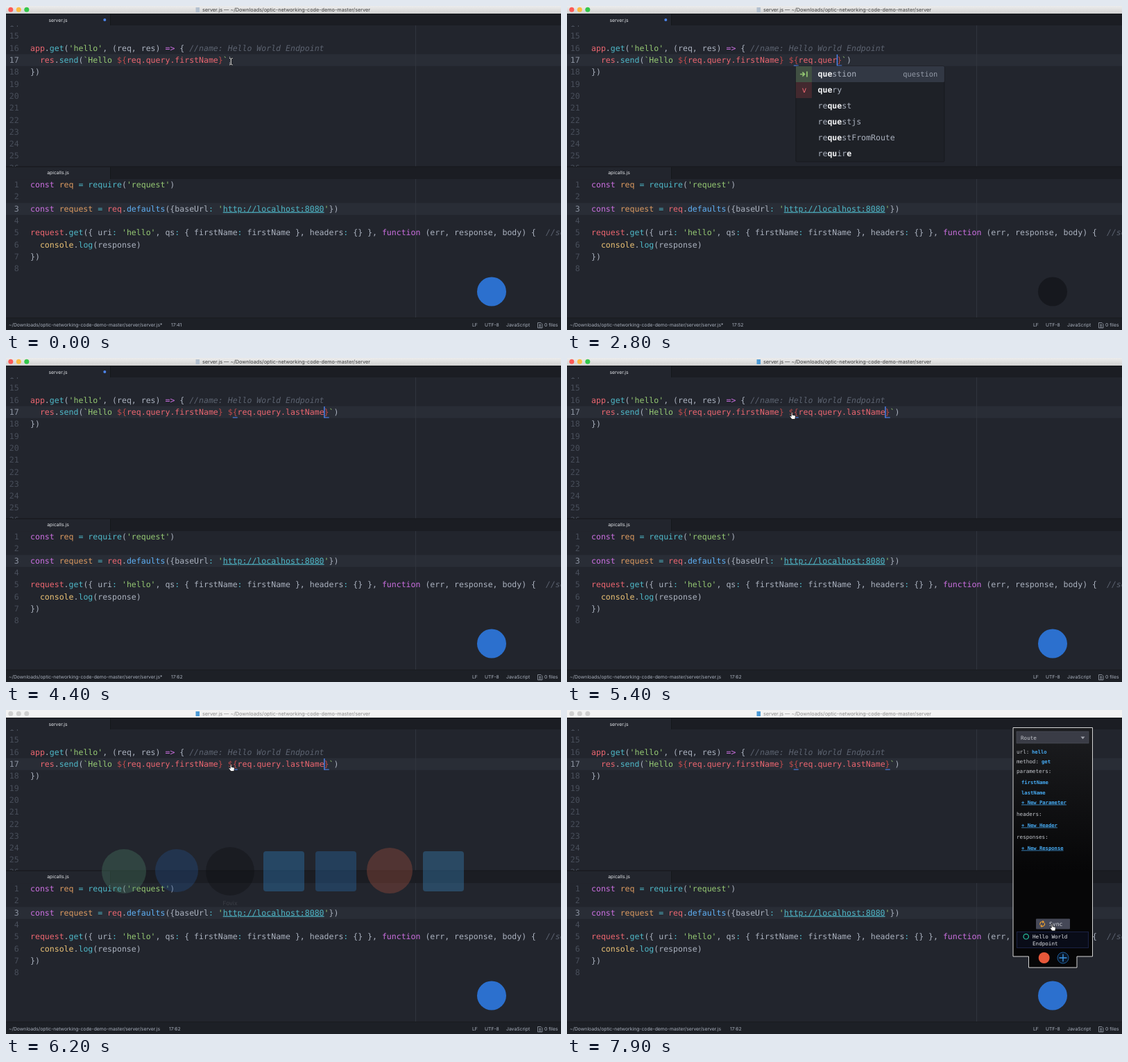
These frames come from a looping animation (800x468 px, 8 s). An HTML page:

```html
<!DOCTYPE html>
<html lang="en">
<head>
<meta charset="utf-8">
<title>Editor demo</title>
<style>
html, body { margin: 0; width: 100%; height: 100%; overflow: hidden; background: #22252d; }
svg { display: block; width: 800px; height: 468px; }
text { white-space: pre; text-rendering: geometricPrecision; }
.code { font: 11.54px "DejaVu Sans Mono", monospace; }
.ui { font: 6.8px Inter, sans-serif; }
.panel { font: 7.6px "DejaVu Sans Mono", monospace; }
.w { fill: #abb2bf; } .r { fill: #ec6670; } .d { fill: #bf4a4c; } .g { fill: #95c873; }
.p { fill: #cb6fe0; } .b { fill: #5fb0f5; } .c { fill: #4fb9c9; } .o { fill: #db9a60; }
.y { fill: #ebc275; } .k { fill: #5c6370; font-style: italic; }
.u { fill: #4fb9c9; text-decoration: underline; }
.m { fill: #f4f5f7; font-weight: bold; }
</style>
</head>
<body>
<svg viewBox="0 0 800 468" xml:space="preserve">
  <defs>
    <clipPath id="topPane"><rect y="28" width="800" height="204"/></clipPath>
    <linearGradient id="bar" x2="0" y2="1"><stop stop-color="#ececec"/><stop offset="1" stop-color="#d2d2d2"/></linearGradient>
    <linearGradient id="sheet" x2="0" y2="1"><stop stop-color="#1c1d20"/><stop offset=".6" stop-color="#060607"/></linearGradient>
  </defs>
  <g id="base"></g>
  <g id="live"></g>
</svg>
<script>
const CW = 6.947, LEFT = 35, ROW = 17.3, LOOP = 8000;
const $ = id => document.getElementById(id);
const col = i => LEFT + i * CW;
const topY = n => 82 + (n - 17) * ROW;
const lowY = n => 262 + (n - 1) * ROW;

const rect = (x, y, w, h, fill, more = '') =>
  `<rect x="${x}" y="${y}" width="${w}" height="${h}" fill="${fill}" ${more}/>`;
const circle = (x, y, r, fill, more = '') =>
  `<circle cx="${x}" cy="${y}" r="${r}" fill="${fill}" ${more}/>`;
const path = (d, more) => `<path d="${d}" ${more}/>`;
const text = (x, y, s, cls, more = '') => `<text x="${x}" y="${y}" class="${cls}" ${more}>${s}</text>`;

// Each piece after a bar starts with its colour class.
const paint = s => s.split('¦').slice(1).map(p => `<tspan class="${p[0]}">${p.slice(1)}</tspan>`).join('');
const code = (y, s) => text(LEFT, y, paint(s), 'code');
const lineNo = (n, y, on) => text(18.6, y, n, 'code', `text-anchor="end" fill="${on ? '#8b92a0' : '#484e5a'}"`);

function drawBase() {
  let s = rect(0, 0, 800, 468, '#22252d');
  s += rect(0, 69.5, 800, 17.3, '#292d36') + rect(0, 284.5, 800, 17.3, '#292d36');
  s += rect(590, 28, 1, 422, '#30343d');
  s += rect(0, 11, 800, 17, '#1b1d23') + rect(0, 11, 150, 18, '#22252d');
  s += rect(0, 232, 800, 18, '#1b1d23') + rect(0, 232.5, 150, 18, '#22252d');
  s += rect(150, 12, 1, 16, '#15171b') + rect(150, 233, 1, 17, '#15171b') + rect(0, 231.5, 800, 1, '#17191d');
  const tab = 'text-anchor="middle" fill="#e4e6ea" font-weight="500"';
  s += text(75, 22.5, 'server.js', 'ui', tab) + text(75, 243.3, 'apicalls.js', 'ui', tab);

  let rows = '';
  for (let n = 14; n <= 26; n++) rows += lineNo(n, topY(n), n === 17);
  s += `<g clip-path="url(#topPane)">${rows}</g>`;
  for (let n = 1; n <= 8; n++) s += lineNo(n, lowY(n), n === 3);

  s += code(topY(16), "¦rapp¦w.¦cget¦w(¦g'hello'¦w, (req, res) ¦p=>¦w { ¦k//name: Hello World Endpoint");
  s += code(topY(18), '¦w})');
  s += code(lowY(1), "¦pconst ¦oreq ¦c= require¦w(¦g'request'¦w)");
  s += code(lowY(3), "¦pconst ¦orequest ¦c= ¦rreq¦w.¦bdefaults¦w({baseUrl¦c: ¦g'¦uhttp://localhost:8080¦g'¦w})");
  s += code(lowY(5), "¦rrequest¦w.¦cget¦w({ uri¦c: ¦g'hello'¦w, qs¦c: ¦w{ firstName¦c: ¦wfirstName }, headers¦c: ¦w{} }, " +
    '¦pfunction ¦w(err, response, body) {  ¦k//send');
  s += code(lowY(6), '¦y  console¦w.¦clog¦w(response)') + code(lowY(7), '¦w})');

  s += rect(0, 450, 800, 18, '#1d2026') + rect(0, 450, 800, .7, '#17191d');
  for (const [x, label] of [[672, 'LF'], [690, 'UTF-8'], [721, 'JavaScript'], [776, '0 files']])
    s += text(x, 463.3, label, 'ui w');
  s += path('M766.5 457.5h4.5l2 2v5.5h-6.500zM768 461h3.500M769.700 459.300v3.400M768 463.800h3.500',
    'fill="none" stroke="#9aa1ad" stroke-width=".8"');
  $('base').innerHTML = s;
}

const TYPED = ' ${req.query.lastName';
const KEYS = [500, 800, 1200, 1600, 1800, 2000, 2200, 2300, 2500, 2600, 2800,
  2900, 3000, 3200, 3300, 3400, 3700, 3900, 4000, 4200, 4300];
const countAt = t => KEYS.filter(k => k <= t).length;

const LISTS = [
  { start: 3, width: 196, icons: true, items: [['req', 'CommonJS require', 'snip'], ['ret', 'return', 'snip'], ['review', 'review', 'snip']] },
  { start: 7, width: 214, icons: true, items: [['question', 'question', 'snip'], ['query', '', 'var'], ['request'],
    ['requestjs'], ['requestFromRoute'], ['require']] },
  { start: 13, width: 140, items: [['localhost']] }
];

// Marks the letters of a word that match the prefix in order; null when it does not fit.
function fuzzy(word, prefix) {
  let i = 0;
  const out = [...word].map(ch => ch === prefix[i] ? (i++, '¦m' + ch) : '¦w' + ch).join('');
  return i === prefix.length ? out : null;
}

function popup(list, typed) {
  const prefix = typed.slice(list.start);
  if (!prefix) return '';
  const rows = list.items.map(it => [fuzzy(it[0], prefix), ...it.slice(1)]).filter(r => r[0]);
  if (!rows.length) return '';
  const wordX = col(40 + list.start), x = wordX - (list.icons ? 31.6 : 7), h = 23;
  const end = x + list.width;
  let s = rect(x, 87, list.width, rows.length * h, '#1e2127', 'rx="1.5" stroke="#17191d" stroke-width=".8"');
  s += rect(x, 87, list.width, list.icons ? h : 22.5, '#323844', 'rx="1.5"');
  rows.forEach(([label, hint, kind], i) => {
    const y = 87 + i * h;
    if (kind === 'snip') {
      s += rect(x, y, 23, h, i ? '#2d3833' : '#415043');
      s += path(`M${x + 6} ${y + 11.500}h6M${x + 9.500} ${y + 8.500}l3 3l-3 3M${x + 16} ${y + 7.500}v8`,
        'fill="none" stroke="#95c873" stroke-width="1.7"');
    } else if (kind === 'var') {
      s += rect(x, y, 23, h, '#43292f') + text(x + 8.5, y + 14.800, 'v', 'code r', 'font-weight="bold"');
    }
    s += text(wordX, y + 15, paint(label), 'code');
    if (hint) {
      const place = list.start === 3 ? `${x + 84}` : `${end - 9.5 - hint.length * 6.26}`;
      s += text(place, y + 14.600, hint, 'code', `style="font-size:10.4px" fill="${i ? '#6b7280' : '#949ba8'}"`);
    }
  });
  return s;
}

function titleBar(active, dirty) {
  let s = rect(0, 0, 800, 11, active ? 'url(#bar)' : '#f3f3f3') + rect(0, 11, 800, .8, '#111317');
  ['#fc5b57', '#fdbc40', '#34c84a'].forEach((c, i) => s += circle(6.8 + i * 11.5, 5.3, 3.5, active ? c : '#cfcfcf'));
  s += rect(273.5, 2, 5.500, 7, dirty ? '#b3c0cf' : '#4d9bd6');
  return s + text(283, 8.1, 'server.js — ~/Downloads/optic-networking-code-demo-master/server', 'ui',
    `style="font-size:7.27px" fill="${active ? '#3c3c3c' : '#8a8a8a'}"`);
}

function switcher(opacity) {
  const sq = (x, fill) => rect(x, 204, 59, 58, fill, 'rx="4"');
  return `<g opacity="${opacity}">` +
    circle(170, 233, 32, '#4b7f66') + circle(246, 232, 31, '#24508c') +
    circle(323, 233, 35, '#0c0d10') + sq(371, '#2f86cc') + sq(446, '#2a6fb0') +
    circle(553, 232, 33, '#a9523f') + sq(601, '#3a8cc8') +
    text(323, 282, 'Fovix', 'ui', 'text-anchor="middle" style="font-size:8.5px" fill="#6a6e76"') + '</g>';
}

function routePanel() {
  let s = path('M643 25.500H757.500V356H735V372H665.500V356H643Z', 'fill="url(#sheet)" stroke="#d4d4d4"');
  s += rect(648, 31, 104, 17, '#3a3c46', 'stroke="#4a4d58" stroke-width=".7"');
  s += path('M740.500 38.500h6l-3 3.500z', 'fill="#a5a8b0"');
  const plain = (x, y, t) => text(x, y + 2.700, t, 'panel', 'fill="#c3c6cc"');
  const blue = (x, y, t, deco = 'none') => text(x, y + 2.600, t, 'panel',
    `style="font-size:7.2px;font-weight:bold;text-decoration:${deco}" fill="#46aaf2"`);
  s += plain(654, 40, 'Route') + plain(648, 60, 'url:') + blue(670, 60, 'hello');
  s += plain(648, 74, 'method:') + blue(684, 74, 'get') + plain(648, 88.5, 'parameters:');
  s += blue(655, 104, 'firstName') + blue(655, 119, 'lastName') + blue(655, 133, '+ New Parameter', 'underline');
  s += plain(648, 150, 'headers:') + blue(655, 166, '+ New Header', 'underline');
  s += plain(648, 183, 'responses:') + blue(655, 199, '+ New Response', 'underline');
  s += rect(676, 301.500, 49, 15, '#454857', 'rx="1"');
  s += path('M682 310.500a3.300 3.300 0 0 1 4.500 -4.300M688.200 307.500a3.300 3.300 0 0 1 -4.500 4.400M685.500 304.500l1.800 1.800l-2 1.400M684.700 313.600l-1.800 -1.800l2 -1.400',
    'fill="none" stroke="#f0a030" stroke-width="1.1"');
  s += text(695, 312, 'Sync', 'panel', 'style="font-size:8px" fill="#d3d5da"');
  s += rect(648.500, 320.500, 103, 23, '#090c18', 'stroke="#1a2244"');
  s += circle(661.700, 327.300, 3.700, 'none', 'stroke="#28c3a0" stroke-width="1.2"');
  s += text(671, 330, 'Hello World', 'panel', 'fill="#e2e4e8"') + text(671, 339.500, 'Endpoint', 'panel', 'fill="#e2e4e8"');
  s += circle(687.700, 358, 8, '#e8583a') + circle(715, 358, 8, '#0a1626', 'stroke="#1f5f9c"');
  return s + path('M709.500 358h11M715 352.500v11', 'stroke="#3d9bea" stroke-width="1.300"');
}

const ramp = (t, a, b) => Math.min(1, Math.max(0, (t - a) / (b - a)));
const ease = k => k * k * (3 - 2 * k);

function button(t) {
  const glow = t < 2700 ? 1 - ramp(t, 900, 2500) : ramp(t, 2900, 3400);
  const mix = (a, b) => Math.round(a + (b - a) * glow);
  return circle(700, 412.500, 21, `rgb(${mix(22, 44)},${mix(24, 112)},${mix(30, 206)})`);
}

function pointer(t) {
  if (t < 500) {
    const d = 'M322 75.500q2 0 2.300 1.300q.3 -1.300 2.300 -1.300M324.300 76.500v7.500M322 85q2 0 2.300 -1.300q.3 1.300 2.300 1.300';
    return path(d, 'fill="none" stroke="#111" stroke-width="2.200"') + path(d, 'fill="none" stroke="#eee"');
  }
  if (t < 5000) return '';
  const k = ease(ramp(t, 6600, 7300));
  return path('M-1.800 -4q1 -1 1.800 0v3.200l3.600 .8q1 .3 .8 1.600l-.7 3.900h-4.600l-3 -4q0 -1.300 1.200 -.9l.9 .8z',
    `transform="translate(${325 + 375 * k} ${83 + 230.500 * k})" fill="#fff" stroke="#111" stroke-width=".8"`);
}

function draw(t) {
  const n = countAt(t), typed = TYPED.slice(0, n), dirty = t < 4700, focus = t < 6300;
  let s = titleBar(t < 6100, dirty);
  if (dirty) s += circle(142.300, 20, 2, '#4d86ee');

  const added = n < 3 ? '¦g' + typed : '¦g ¦d${¦r' + typed.slice(3) + '¦d}';
  s += code(topY(17), '¦r  res¦w.¦csend¦w(¦g`Hello ¦d${¦rreq.query.firstName¦d}' + added + '¦g`¦w)');
  if (n >= 3) for (const i of [42, 40 + n]) s += rect(col(i), 85.500, CW, 1, '#528bff');
  const lastKey = n ? KEYS[n - 1] : -400;
  if (focus && Math.floor((t - lastKey) / 400) % 2 === 0) s += rect(col(40 + n) - .5, 70, 1.300, 16.500, '#528bff');

  s += text(4, 463.300, '~/Downloads/optic-networking-code-demo-master/server/server.js' + (dirty ? '*' : ''), 'ui w');
  s += text(dirty ? 238 : 235, 463.300, '17:' + (41 + n), 'ui w');

  const known = TYPED.slice(0, countAt(t - 100));
  for (const list of LISTS) s += popup(list, known);
  if (t >= 6000 && t < 6300) s += switcher(t < 6200 ? .8 : .35);
  if (t >= 6300) s += routePanel();
  $('live').innerHTML = s + button(t) + pointer(t);
}

drawBase();
let shown = -1;
function tick() {
  const t = Math.floor(performance.now() % LOOP / 100) * 100;
  if (t !== shown) draw(shown = t);
  requestAnimationFrame(tick);
}
tick();
</script>
</body>
</html>
```
